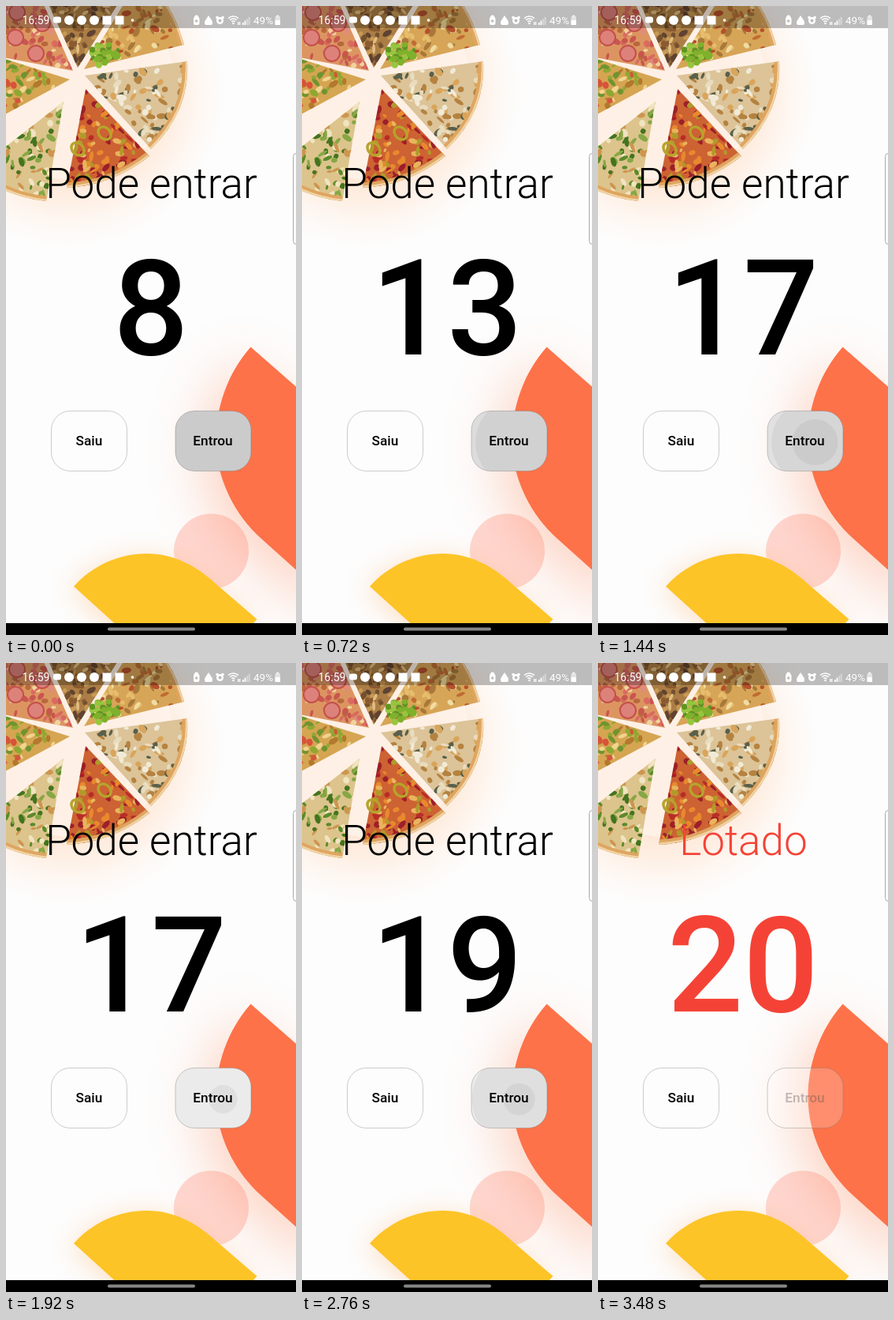
An HTML page with a canvas for the animation above (3.6 s loop, 368 by 796 pixels).

```html
<!DOCTYPE html>
<html lang="pt">
<head>
<meta charset="utf-8">
<title>Pode entrar</title>
<style>
  html, body { margin: 0; width: 368px; height: 796px; overflow: hidden; background: #fdfdfd; }
  canvas, svg { position: absolute; left: 0; top: 0; width: 368px; height: 796px; }
  text { font-family: Roboto, sans-serif; text-anchor: middle; }
  .title { font-size: 53px; font-weight: 300; }
  .count { font-size: 169px; font-weight: 500; }
  .label { font-size: 17.3px; font-weight: 500; }
  .bar { font-size: 14px; fill: #fff; text-anchor: start; }
</style>
</head>
<body>
<canvas id="stage" width="368" height="796"></canvas>
<svg viewBox="0 0 368 796">
  <text class="bar" x="20.5" y="23">16:59</text>
  <text class="bar" x="314" y="23" style="font-size:13.5px">49%</text>
  <text class="title" id="title" x="184.5" y="243"></text>
  <text class="count" id="count" x="184" y="441"></text>
  <text class="label" x="105.5" y="556">Saiu</text>
  <text class="label" id="enter" x="262.5" y="556">Entrou</text>
</svg>
<script>
const W = 368, H = 796, LOOP = 3600, STEP = 120, FULL = 20;
const ctx = document.getElementById('stage').getContext('2d');
const titleEl = document.getElementById('title');
const countEl = document.getElementById('count');
const enterEl = document.getElementById('enter');

// Moments the finger lands; the counter follows after LAG
const LAG = 50;
const earlier = [-290, -260, -230];
const taps = [70, 190, 310, 430, 550, 830, 1150, 1270, 1390, 1920, 2570, 2750];

let seed = 7;
const rnd = () => (seed = (seed * 16807) % 2147483647) / 2147483647;

function layer(draw) {
  const c = document.createElement('canvas');
  c.width = W; c.height = H;
  draw(c.getContext('2d'));
  return c;
}

function disc(g, x, y, r, fill) {
  g.fillStyle = fill;
  g.beginPath();
  g.arc(x, y, r, 0, Math.PI * 2);
  g.fill();
}

function box(g, x, y, w, h, r) {
  g.beginPath();
  g.roundRect(x, y, w, h, r);
}

// Apex, one rim end, rim control point, other rim end, base tone, topping tones
const slices = [
  [[100, 88], [230, 70], [234, 132], [184, 181], '#dcc398', ['#f1ead6', '#e9dcbd', '#59604a', '#b5823f', '#d9a55a']],
  [[101, 105], [182, 190], [135, 227], [77, 230], '#cd6232', ['#9c1f2a', '#b82c28', '#e8892d', '#b09a2b', '#e9b45d']],
  [[73, 121], [51, 247], [0, 242], [-40, 209], '#dcc48c', ['#5b8a2a', '#44741f', '#f0e4c0', '#cd9650', '#87a745']],
  [[81, 93], [-40, 158], [-60, 100], [-40, 55], '#d5a552', ['#8fa832', '#d8523a', '#f0d490', '#b3792e', '#6f9430']],
  [[85, 82], [-40, 58], [-40, -40], [42, -15], '#dc9560', ['#c9554f', '#e08a80', '#f0d39a', '#b8683c', '#d86a60']],
  [[91, 78], [48, -15], [90, -30], [150, -15], '#ac7e45', ['#5f4230', '#c99a55', '#8a5a30', '#e0bd80', '#74502f']],
  [[99, 80], [157, -15], [200, -40], [226, 49], '#d7a557', ['#c06c34', '#f0dca0', '#b5502c', '#a8783a', '#e6bd6d']]
];

function slicePath(g, [p, a, c, b]) {
  g.beginPath();
  g.moveTo(...p);
  g.lineTo(...a);
  g.quadraticCurveTo(...c, ...b);
  g.closePath();
}

function drawSlice(g, s) {
  const [p, a, c, b, base, tones] = s;
  g.save();
  slicePath(g, s);
  g.fillStyle = base;
  g.fill();
  g.clip();
  for (let i = 0; i < 95; i++) {
    const u = rnd(), v = Math.sqrt(rnd()) * 1.1;
    const ex = a[0] + (b[0] - a[0]) * u, ey = a[1] + (b[1] - a[1]) * u;
    const bulge = u * (1 - u) * 2;
    const rx = ex + (c[0] - (a[0] + b[0]) / 2) * bulge;
    const ry = ey + (c[1] - (a[1] + b[1]) / 2) * bulge;
    g.fillStyle = tones[Math.floor(rnd() * tones.length)];
    g.beginPath();
    g.ellipse(p[0] + (rx - p[0]) * v, p[1] + (ry - p[1]) * v,
      2.5 + rnd() * 4.5, 1.5 + rnd() * 2.5, rnd() * 3.14, 0, 6.3);
    g.fill();
  }
  g.beginPath();
  g.moveTo(...a);
  g.quadraticCurveTo(...c, ...b);
  g.strokeStyle = '#dfa560';
  g.lineWidth = 13;
  g.stroke();
  g.strokeStyle = '#f0d3a4';
  g.lineWidth = 5;
  g.stroke();
  g.restore();
}

function drawPizza(g) {
  const glow = g.createRadialGradient(80, 108, 100, 80, 108, 200);
  glow.addColorStop(0, 'rgba(255,222,196,.75)');
  glow.addColorStop(.4, 'rgba(255,226,204,.5)');
  glow.addColorStop(.75, 'rgba(255,236,222,.25)');
  glow.addColorStop(1, 'rgba(255,240,230,0)');
  g.fillStyle = glow;
  g.fillRect(0, 0, W, 330);
  disc(g, 84, 92, 128, 'rgba(255,246,238,.7)');
  slices.forEach(s => drawSlice(g, s));
  // lettuce
  for (let i = 0; i < 34; i++) {
    const x = 108 + rnd() * 34, y = 76 - (x - 108) * .5 - rnd() * 26 + 4;
    disc(g, x, y, 2 + rnd() * 3, ['#7fb12c', '#97c63e', '#5f9423'][i % 3]);
  }
  // salami
  [[12, 40], [38, 60], [46, 22], [14, 8]].forEach(([x, y]) => {
    disc(g, x, y, 11, '#c4504c');
    disc(g, x, y, 9, '#dc827a');
  });
  // pepper rings
  g.strokeStyle = '#b5a42c';
  g.lineWidth = 3.5;
  [[125, 161], [91, 181]].forEach(([x, y]) => {
    g.beginPath();
    g.ellipse(x, y, 9, 7, .8, 0, 6.3);
    g.stroke();
  });
}

function glowing(g, color, blur, dx, dy, fill, trace) {
  g.save();
  g.shadowColor = color;
  g.shadowBlur = blur;
  g.shadowOffsetX = dx;
  g.shadowOffsetY = dy;
  g.fillStyle = fill;
  g.beginPath();
  trace();
  g.closePath();
  g.fill();
  g.restore();
}

function drawShapes(g) {
  glowing(g, 'rgba(255,130,80,.34)', 70, -16, 18, '#fd7249', () => {
    g.moveTo(310.5, 431.5);
    g.bezierCurveTo(281, 465, 266.5, 508, 266.5, 549);
    g.bezierCurveTo(266.5, 598, 290, 644, 325, 675);
    g.lineTo(420, 760);
    g.lineTo(420, 527);
  });
  disc(g, 260.5, 690, 47.5, 'rgba(255,115,92,.28)');
  glowing(g, 'rgba(255,160,70,.3)', 34, -4, 4, '#fdc427', () => {
    g.moveTo(86, 734.5);
    g.bezierCurveTo(110, 708, 143, 693, 179, 693);
    g.bezierCurveTo(212, 693, 241, 708, 266, 731);
    g.lineTo(318.5, 776);
    g.lineTo(300, 796);
    g.lineTo(154, 796);
  });
}

function drawIcons(g) {
  const white = '#fff';
  box(g, 60, 13.5, 10, 8, 3);
  g.fillStyle = white;
  g.fill();
  [80, 96, 112].forEach(x => disc(g, x, 18, 6, white));
  [122.5, 138.5].forEach(x => g.fillRect(x, 12.5, 11, 11));
  disc(g, 160.5, 18, 1.8, white);

  box(g, 238, 14, 7.5, 10, 2);
  g.fill();
  disc(g, 241.7, 14, 2.6, white);
  disc(g, 241.7, 19, 1.7, '#bbb');
  g.fillStyle = white;
  box(g, 252, 18, 10, 6, 2);
  g.fill();
  g.beginPath();
  g.moveTo(257, 12); g.lineTo(261, 18); g.lineTo(253, 18);
  g.fill();
  g.fillRect(255.5, 20, 3, 1);
  disc(g, 271.5, 18.5, 4.5, white);
  disc(g, 268, 14.5, 1.8, white);
  disc(g, 275, 14.5, 1.8, white);
  disc(g, 271.5, 18.5, 2, '#bbb');

  g.strokeStyle = white;
  g.lineWidth = 1.5;
  [3, 6, 9].forEach(r => {
    g.beginPath();
    g.arc(288.5, 22, r, Math.PI * 1.25, Math.PI * 1.75);
    g.stroke();
  });
  disc(g, 288.5, 22, 1.3, white);
  g.fillRect(294, 20, 1.3, 4);
  g.fillRect(296, 20, 1.3, 4);
  for (let i = 0; i < 4; i++) {
    g.fillStyle = i < 2 ? white : 'rgba(255,255,255,.45)';
    g.fillRect(300 + i * 2.6, 21 - i * 2.4, 1.7, 3 + i * 2.4);
  }
  g.fillStyle = 'rgba(255,255,255,.6)';
  box(g, 341.5, 13, 6.5, 11, 1.5);
  g.fill();
  g.fillStyle = white;
  g.fillRect(343.2, 11.8, 3, 1.4);
  g.fillRect(341.5, 18, 6.5, 6);
}

function drawButton(g, x, fill) {
  box(g, x, 512.5, 96, 76, 24);
  g.fillStyle = fill;
  g.fill();
  g.strokeStyle = 'rgba(120,120,120,.42)';
  g.lineWidth = .9;
  g.stroke();
}

const backdrop = layer(g => {
  g.fillStyle = '#fdfdfd';
  g.fillRect(0, 0, W, H);
  drawPizza(g);
  drawShapes(g);
  g.fillStyle = 'rgba(0,0,0,.26)';
  g.fillRect(0, 0, W, 28);
  drawIcons(g);
  box(g, 364.5, 186.5, 20, 115, 4);
  g.fillStyle = '#fdfdfd';
  g.fill();
  g.strokeStyle = '#a9a9a9';
  g.lineWidth = 1;
  g.stroke();
  g.fillStyle = '#000';
  g.fillRect(0, 781, W, 15);
  box(g, 129, 786.5, 111, 4, 2);
  g.fillStyle = '#858585';
  g.fill();
  drawButton(g, 57.5, '#fdfdfd');
});

// Ink strength by age: holds, then fades out
const ink = age => age < 0 ? 0 : Math.max(0, Math.min(1, (500 - age) / 250));

function drawInk(g, t) {
  g.save();
  box(g, 215, 512.5, 96, 76, 24);
  g.clip();
  let press = 0;
  earlier.concat(taps).forEach(tap => {
    const age = t - tap, k = ink(age);
    if (!k) return;
    press = Math.max(press, k);
    disc(g, 275.5, 552, Math.min(90, 18 + age * .22), `rgba(0,0,0,${.052 * k})`);
  });
  g.fillStyle = `rgba(0,0,0,${.07 * press})`;
  g.fillRect(215, 512, 97, 78);
  g.restore();
}

function render(now) {
  const t = Math.floor((now % LOOP) / STEP) * STEP;
  const n = 8 + taps.filter(tap => tap + LAG <= t).length;
  const full = n >= FULL;
  ctx.drawImage(backdrop, 0, 0);
  drawButton(ctx, 215, full ? 'rgba(255,255,255,.2)' : '#fdfdfd');
  drawInk(ctx, t);
  titleEl.textContent = full ? 'Lotado' : 'Pode entrar';
  countEl.textContent = n;
  titleEl.style.fill = countEl.style.fill = full ? '#f44336' : '#000';
  enterEl.style.fill = full ? 'rgba(90,80,80,.38)' : '#000';
}

const start = performance.now();
function loop() {
  render(performance.now() - start);
  requestAnimationFrame(loop);
}
loop();
</script>
</body>
</html>
```
